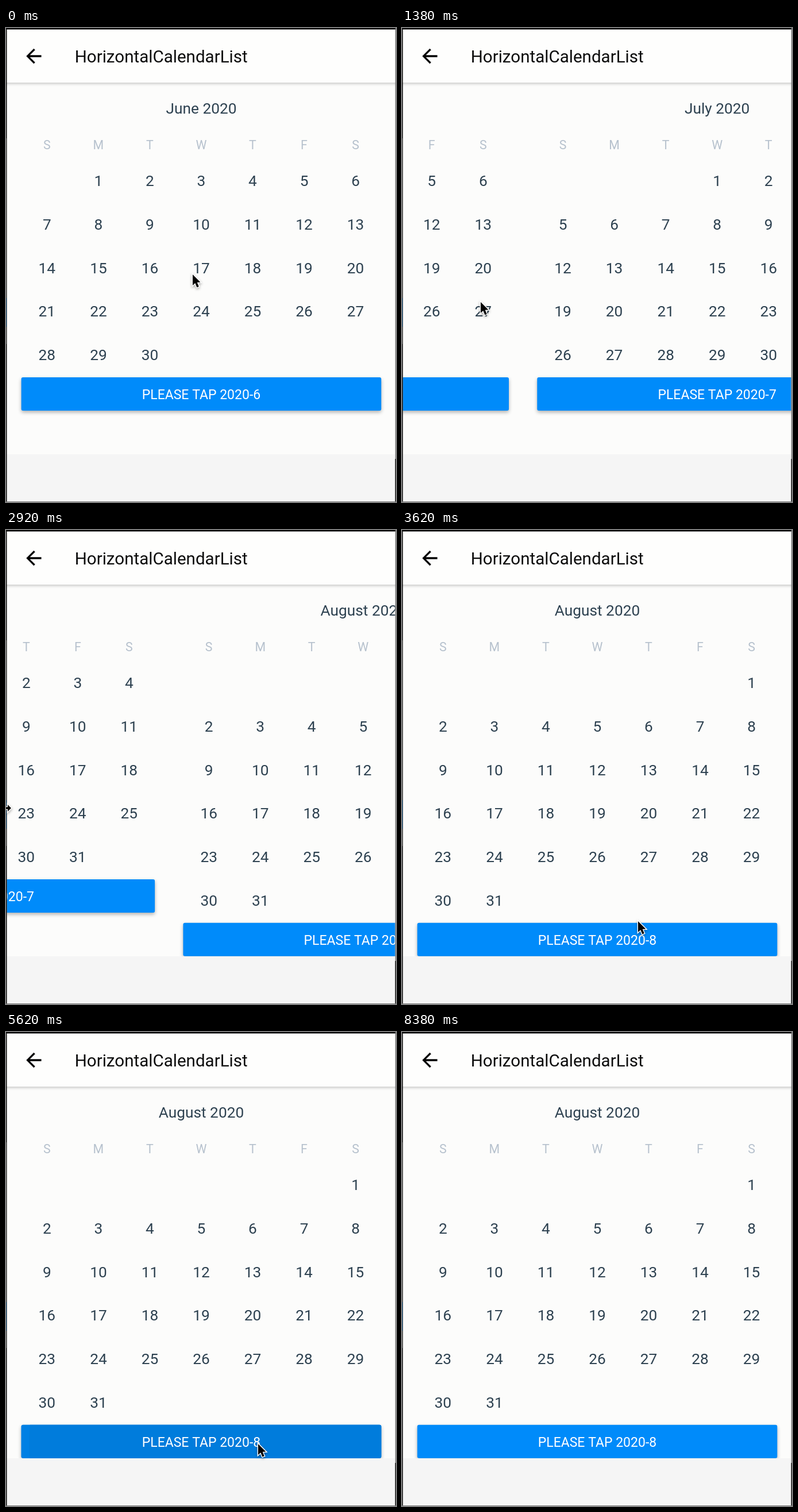
Write an HTML page with a canvas that moves like this. It is 679 px wide and 825 px high and loops after 8480 ms.

```html
<!DOCTYPE html>
<html lang="en">
<head>
<meta charset="utf-8">
<title>Horizontal calendar</title>
<style>
  html, body { margin: 0; width: 100%; height: 100%; overflow: hidden; background: #fcfcfb; }
  canvas { display: block; width: 679px; height: 825px; }
</style>
</head>
<body>
<canvas id="stage" width="679" height="825"></canvas>
<script>
const ctx = document.getElementById('stage').getContext('2d');
const W = 679, H = 825, LOOP = 8480;
const DP = 1.643;               // pixels per layout unit
const PAGE = 676, COL = 89.53, ROW = 75.65, LEFT = 26.6;
const LIST_TOP = 96, LIST_BOTTOM = 742;
const INK = '#2d4150', BLUE = '#008bfa', PRESSED = '#007cdc';

const months = [
  { name: 'June', num: 6, first: 1, days: 30 },
  { name: 'July', num: 7, first: 3, days: 31 },
  { name: 'August', num: 8, first: 6, days: 31 }
];

const smooth = p => p * p * (3 - 2 * p);
const drag = p => Math.pow(p, 1.6);
const settle = p => 1 - Math.pow(1 - p, 2.5);
const clamp = v => Math.max(0, Math.min(1, v));

// Keys are [time, ease into this key, ...values].
function track(keys, t) {
  let i = 1;
  while (i < keys.length - 1 && t > keys[i][0]) i++;
  const a = keys[i - 1], b = keys[i];
  const p = b[1](clamp((t - a[0]) / (b[0] - a[0])));
  return a.slice(2).map((v, k) => v + (b[k + 2] - v) * p);
}

const scrollKeys = [
  [0, smooth, 0],
  [1060, smooth, 0],
  [1380, drag, 466],
  [1788, settle, 676],
  [2500, smooth, 676],
  [2920, drag, 1068.5],
  [3340, settle, 1352]
];

const cursorKeys = [
  [0, smooth, 324, 427],
  [860, smooth, 602, 452],
  [1060, smooth, 602, 452],
  [1380, drag, 136, 475],
  [1480, smooth, 128, 476],
  [1700, smooth, 201, 457],
  [2400, smooth, 393, 462],
  [2500, smooth, 393, 462],
  [2920, drag, 0, 484],
  [3060, smooth, -6, 488],
  [3620, smooth, 410, 679],
  [4500, smooth, 430, 706],
  [5400, smooth, 438, 715],
  [7200, smooth, 438, 715],
  [8000, smooth, 452, 738],
  [8320, smooth, 540, 840]
];

function text(str, x, y, size, color, align = 'center') {
  ctx.font = `400 ${size * DP}px Roboto, sans-serif`;
  ctx.textAlign = align;
  ctx.fillStyle = color;
  ctx.fillText(str, x, y);
}

function shadow(blur, dy, alpha) {
  ctx.shadowColor = `rgba(0,0,0,${alpha})`;
  ctx.shadowBlur = blur;
  ctx.shadowOffsetY = dy;
}

function poly(points) {
  ctx.beginPath();
  points.forEach(([x, y]) => ctx.lineTo(x, y));
  ctx.closePath();
}

// Darkens the current path, with a circle growing from the tap point.
function drawRipple(t, x, y) {
  const start = 5480, release = 5700;
  if (t < start || t > release + 260) return;
  const fade = 1 - clamp((t - release) / 260);
  ctx.save();
  ctx.clip();
  ctx.fillStyle = PRESSED;
  ctx.globalAlpha = fade * clamp((t - start) / 80) * 0.7;
  ctx.fillRect(0, 0, W, H);
  ctx.globalAlpha = fade;
  ctx.beginPath();
  ctx.arc(x, y, (t - start) * 2.82, 0, Math.PI * 2);
  ctx.fill();
  ctx.restore();
}

function drawButton(month, rows, t) {
  const y = 608 + (rows - 5) * ROW;
  ctx.save();
  shadow(6, 3, 0.3);
  ctx.fillStyle = BLUE;
  ctx.beginPath();
  ctx.roundRect(LEFT, y, COL * 7, 58, 3);
  ctx.fill();
  ctx.restore();
  if (month.num === 8) drawRipple(t, 438, y + 32);
  text('PLEASE TAP 2020-' + month.num, LEFT + COL * 3.5, y + 38, 14, '#fff');
}

function drawMonth(month, x, t) {
  ctx.save();
  ctx.translate(x, 0);
  const colX = i => LEFT + (i + 0.5) * COL;
  text(month.name + ' 2020', LEFT + COL * 3.5, 149, 16, INK);
  [...'SMTWTFS'].forEach((d, i) => text(d, colX(i), 211, 13, '#b6c1cd'));
  for (let d = 1; d <= month.days; d++) {
    const cell = month.first + d - 1;
    text(d, colX(cell % 7), 275.4 + Math.floor(cell / 7) * ROW, 16, INK);
  }
  drawButton(month, Math.ceil((month.first + month.days) / 7), t);
  ctx.restore();
}

function drawHeader() {
  ctx.save();
  shadow(5, 2, 0.22);
  ctx.fillStyle = '#fefefd';
  ctx.fillRect(-10, 0, W + 20, 95);
  ctx.restore();
  text('HorizontalCalendarList', 119.7, 60.3, 18, '#0c0c0c', 'left');

  ctx.save();
  ctx.translate(48.4 - 12 * DP, 49 - 12 * DP);
  ctx.scale(DP, DP);
  ctx.fillStyle = '#000';
  poly([[20, 11], [7.83, 11], [13.42, 5.41], [12, 4], [4, 12], [12, 20],
        [13.41, 18.59], [7.83, 13], [20, 13]]);
  ctx.fill();
  ctx.restore();
}

function drawFrame() {
  const bar = (c, x, y, w, h) => { ctx.fillStyle = c; ctx.fillRect(x, y, w, h); };
  bar('#000', 0, 0, W, 2.5);
  bar('#111', 0, 0, 1.5, H);
  bar('#4a4a48', 0, 192, 1, 358);
  bar('#0c4672', 0, 470, 1, 50);
  bar('#777', W - 1.3, 0, 1.3, 750);
  bar('#111', W - 1.5, 750, 1.5, H - 750);
  bar('#777', 0, H - 1, W, 1);
}

const arrow = [[1, 2], [1, 21], [5.3, 17], [8.4, 24.5], [11.8, 23], [8.7, 15.8], [14.5, 15.5]];
const resize = [[9, 0], [3, -6], [3, -1.7], [-3, -1.7], [-3, -6], [-9, 0],
                [-3, 6], [-3, 1.7], [3, 1.7], [3, 6]];

function drawCursor(x, y) {
  ctx.save();
  ctx.translate(x, y);
  poly(x < 4 ? resize : arrow);
  ctx.save();
  shadow(4, 2, 0.35);
  ctx.strokeStyle = '#fff';
  ctx.lineWidth = 2.8;
  ctx.stroke();
  ctx.restore();
  ctx.fillStyle = '#000';
  ctx.fill();
  ctx.restore();
}

function draw(t) {
  ctx.fillStyle = '#f5f5f5';
  ctx.fillRect(0, 0, W, H);
  ctx.save();
  ctx.beginPath();
  ctx.rect(1.5, LIST_TOP - 4, PAGE, LIST_BOTTOM - LIST_TOP + 4);
  ctx.clip();
  ctx.fillStyle = '#fcfcfb';
  ctx.fillRect(0, 0, W, H);
  const [scroll] = track(scrollKeys, t);
  months.forEach((m, i) => {
    const x = i * PAGE - scroll;
    if (Math.abs(x) < PAGE) drawMonth(m, x, t);
  });
  ctx.restore();
  drawHeader();
  drawFrame();
  drawCursor(...track(cursorKeys, t));
}

const begin = performance.now();
function tick() {
  draw((performance.now() - begin) % LOOP);
  requestAnimationFrame(tick);
}
tick();
</script>
</body>
</html>
```
